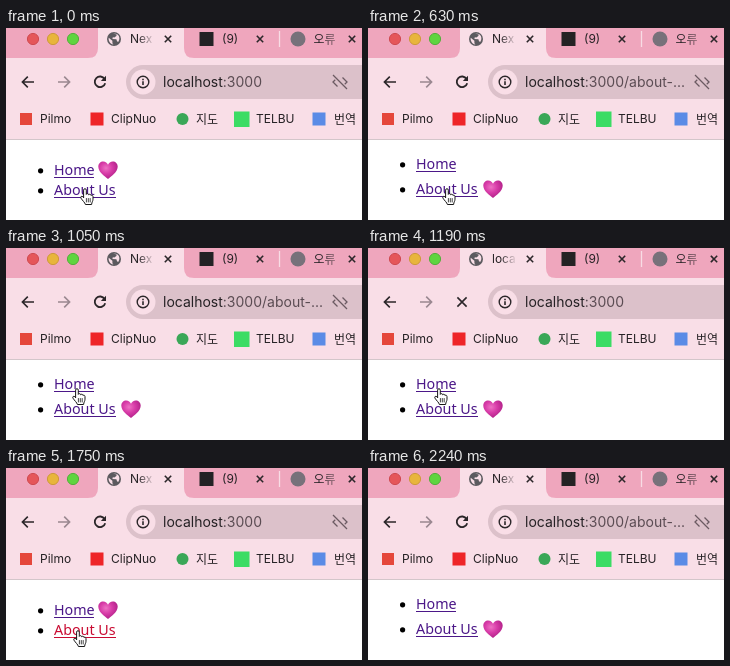
These frames come from a looping animation (356x192 px, 2.59 s). An HTML page:

```html
<!DOCTYPE html>
<html lang="en">
<head>
<meta charset="utf-8">
<title>Page navigation</title>
<style>
html, body { margin: 0; width: 100%; height: 100%; overflow: hidden; background: #fff; }
svg { display: block; width: 356px; height: 192px; }
text { font: 12px Inter, "Noto Sans CJK KR", "Noto Sans CJK", sans-serif; fill: #252124; white-space: pre; }
.url { font-size: 14px; }
.link { font: 14.3px "Noto Sans", sans-serif; fill: #4b1788; }
.active { fill: #c90b32; }
.line { fill: none; stroke: #2b2629; stroke-width: 1.6; }
.thin { fill: none; stroke: #6b5a62; stroke-width: 1.3; }
</style>
</head>
<body>
<svg viewBox="0 0 356 192">
  <defs>
    <linearGradient id="fade" gradientUnits="userSpaceOnUse" x1="132" x2="149" y1="0" y2="0">
      <stop offset="0" stop-color="#252124"/>
      <stop offset="1" stop-color="#252124" stop-opacity="0"/>
    </linearGradient>
    <linearGradient id="fadeEnd" gradientUnits="userSpaceOnUse" x1="314" x2="334" y1="0" y2="0">
      <stop offset="0" stop-color="#252124"/>
      <stop offset="1" stop-color="#252124" stop-opacity=".3"/>
    </linearGradient>
    <radialGradient id="pink" cx=".4" cy=".38" r=".62">
      <stop offset="0" stop-color="#ee72c4"/>
      <stop offset=".5" stop-color="#d83ca8"/>
      <stop offset="1" stop-color="#b3228a"/>
    </radialGradient>
    <path id="cross" class="line" stroke-width="1.4" d="M-3.2-3.2 3.2 3.2M3.2-3.2-3.2 3.2"/>
  </defs>

  <!-- tab strip -->
  <rect width="356" height="30" fill="#efa6bd"/>
  <rect y="30" width="356" height="81" fill="#f9dee7"/>
  <path d="M82 30Q92 30 92 20V0H178V20Q178 30 188 30Z" fill="#f9dee7"/>
  <circle cx="27" cy="11" r="5.6" fill="#e5565a" stroke="#cf4a50"/>
  <circle cx="47" cy="11" r="5.6" fill="#e8b53c" stroke="#cf9a3a"/>
  <circle cx="67" cy="11" r="5.6" fill="#5fd53f" stroke="#55ae3c"/>
  <g id="globe" transform="translate(108 11)">
    <circle r="7" fill="#5c5a5f"/>
    <path d="M-5.3-1.2 -1.6 1.7V4.2L-.6 5.4C-4 5.2-5.8 1.8-5.3-1.2ZM-1-5.2 1.8-5.2 2.6-3.2 .4-1.6-1.2-1.8-1.6 0 2.4 .2 3 2.2 4.2 3C6 .6 5.8-2.6 3.6-4.4" fill="#f9dee7"/>
  </g>
  <path id="spinner" class="thin" d="M106.3 4.3 108.8 4"/>
  <text id="title" x="124" y="15.3" style="fill:url(#fade)"></text>
  <use href="#cross" x="162" y="11"/>
  <rect x="193.5" y="4" width="14" height="14" fill="#242224"/>
  <text x="216" y="15.3">(9)</text>
  <use href="#cross" x="254" y="11"/>
  <path d="M273.5 3V19" stroke="#f8dce5" stroke-width="1.3"/>
  <circle cx="292" cy="11" r="7.5" fill="#77717a"/>
  <text x="307.5" y="15.8" style="fill:url(#fadeEnd)">오류</text>
  <use href="#cross" x="346" y="11"/>

  <!-- address row -->
  <path class="line" d="M28 54H16.5M21.8 48.6 16.4 54 21.8 59.4"/>
  <path class="line" d="M52 54H63.5M58.2 48.6 63.6 54 58.2 59.4" style="stroke:#9a8890"/>
  <g id="reload">
    <path class="line" d="M98.6 51A5.3 5.3 0 1 0 99.2 55.2" style="stroke-width:1.8"/>
    <path d="M100 47.8V53H94.8Z" fill="#2b2629"/>
  </g>
  <path id="stop" class="line" d="M89.4 49.4 98.6 58.6M98.6 49.4 89.4 58.6"/>
  <rect x="120" y="37" width="260" height="34" rx="17" fill="#dcc1ca"/>
  <circle cx="137" cy="54" r="12.5" fill="#f9dee7"/>
  <circle cx="137" cy="54" r="5.8" class="line" style="stroke-width:1.4"/>
  <path class="line" d="M137 53.2V57M137 50.8V52.2"/>
  <text class="url" x="157" y="59">localhost<tspan id="path" fill="#5b4c53"></tspan></text>
  <g id="blocked" class="thin">
    <path d="M331.5 49.5 327 54 331.5 58.5M336.5 49.5 341 54 336.5 58.5"/>
    <path d="M327.5 47.5 341 61" stroke="#dcc1ca" stroke-width="3.6"/>
    <path d="M327 47 341 61"/>
  </g>

  <!-- bookmarks -->
  <rect x="14" y="85" width="12" height="12" fill="#e5473b"/>
  <text x="34" y="95.3">Pilmo</text>
  <rect x="84.5" y="84.5" width="13" height="13" fill="#ee2528"/>
  <text x="105" y="95.3">ClipNuo</text>
  <circle cx="176.5" cy="91" r="6" fill="#3aa757"/>
  <text x="190" y="95.8">지도</text>
  <rect x="228" y="83.5" width="15.5" height="15.5" fill="#3bdc64"/>
  <text x="250" y="95.3">TELBU</text>
  <rect x="306.5" y="84.5" width="13" height="13" fill="#5a8be6"/>
  <text x="328" y="95.8">번역</text>

  <!-- page -->
  <rect y="111" width="356" height="81" fill="#fff"/>
  <rect y="111" width="356" height="1" fill="#d3c6ca"/>
  <g id="home">
    <circle cx="34.6" cy="-4.2" r="2.6"/>
    <g class="link"><text class="link" x="48" style="fill:inherit">Home</text><rect x="48" y="2" width="40" height="1"/></g>
  </g>
  <g id="about">
    <circle cx="34.6" cy="-4.2" r="2.6"/>
    <g class="link"><text class="link" x="48" style="fill:inherit">About Us</text><rect x="48" y="2" width="62" height="1"/></g>
  </g>
  <path id="heart" fill="url(#pink)" d="M10 18C7 15.5.5 11.5.3 5.8.2 2.4 2.6.4 5.2.4 7.5.4 9.2 1.8 10 3.8 10.8 1.8 12.5.4 14.8.4 17.4.4 19.8 2.4 19.7 5.8 19.5 11.5 13 15.5 10 18Z"/>
  <g id="hand" stroke="#151515" stroke-linejoin="round" stroke-linecap="round">
    <path fill="#fff" d="M3.6 9V2.1A1.35 1.35 0 0 1 6.3 2.1V6.4C6.7 5.3 8.6 5.4 8.8 6.8 9.3 5.9 10.9 6.1 11 7.5 11.7 6.8 13 7.2 13 8.6V11.2C13 13.2 11.8 14 11.6 16.5H5.4C5 14.5 2.4 12.6 1 10.2.1 8.7 1.7 7.6 2.9 8.8L3.6 9.6Z"/>
    <path fill="none" stroke-width=".8" d="M6.4 10.5V14M8.3 10.5V14M10.2 10.5V14"/>
  </g>
</svg>
<script>
const LOOP = 2590, STEP = 70;
const $ = id => document.getElementById(id);

// start time and what changes from then on
const events = [
  [0, { url: "home", page: "home", title: "Nex", loading: false, blank: false, blocked: true, active: "" }],
  [140, { active: "about" }],
  [210, { active: "", loading: true, blank: true }],
  [350, { url: "about", page: "about", blank: false }],
  [420, { loading: false }],
  [1120, { active: "home" }],
  [1190, { active: "", url: "home", title: "loca", loading: true, blocked: false }],
  [1260, { page: "home" }],
  [1330, { title: "Nex", loading: false, blocked: true }],
  [1750, { active: "about" }],
  [1820, { active: "", url: "about", title: "loca", loading: true, blocked: false }],
  [1890, { page: "about" }],
  [1960, { title: "Nex", loading: false, blocked: true }]
];

// time, x, y of the pointer's top left corner
const track = [
  [0, 74, 160], [630, 74, 160], [840, 67, 143], [1050, 66, 140],
  [1260, 66, 140], [1470, 66, 154], [1680, 67, 162],
  [1890, 67, 162], [2100, 73, 193], [LOOP, 73, 193]
];

const layout = {
  home: { home: 147, about: 167, heart: [92, 133] },
  about: { home: 141, about: 166, heart: [115, 152] }
};

function pointerAt(t) {
  const i = track.findIndex(p => p[0] > t);
  const [t0, x0, y0] = track[i - 1], [t1, x1, y1] = track[i];
  const k = (t - t0) / (t1 - t0), e = k * k * (3 - 2 * k);
  return [x0 + (x1 - x0) * e, y0 + (y1 - y0) * e];
}

const move = (id, x, y) => $(id).setAttribute("transform", `translate(${x} ${y})`);
const show = (id, on) => $(id).style.display = on ? "" : "none";

function draw(time) {
  const t = Math.floor(time % LOOP / STEP) * STEP;
  const s = Object.assign({}, ...events.filter(e => e[0] <= t).map(e => e[1]));
  const place = layout[s.page];
  for (const id of ["home", "about"]) {
    move(id, 0, place[id]);
    $(id).querySelector("g").classList.toggle("active", s.active === id);
  }
  move("heart", ...place.heart);
  move("hand", ...pointerAt(t));
  $("title").textContent = s.title;
  $("path").textContent = s.url === "about" ? ":3000/about-..." : ":3000";
  show("globe", !s.blank);
  show("spinner", s.blank);
  show("reload", !s.loading);
  show("stop", s.loading);
  show("blocked", s.blocked);
}

const start = performance.now();
function tick() {
  draw(performance.now() - start);
  requestAnimationFrame(tick);
}
tick();
</script>
</body>
</html>
```
